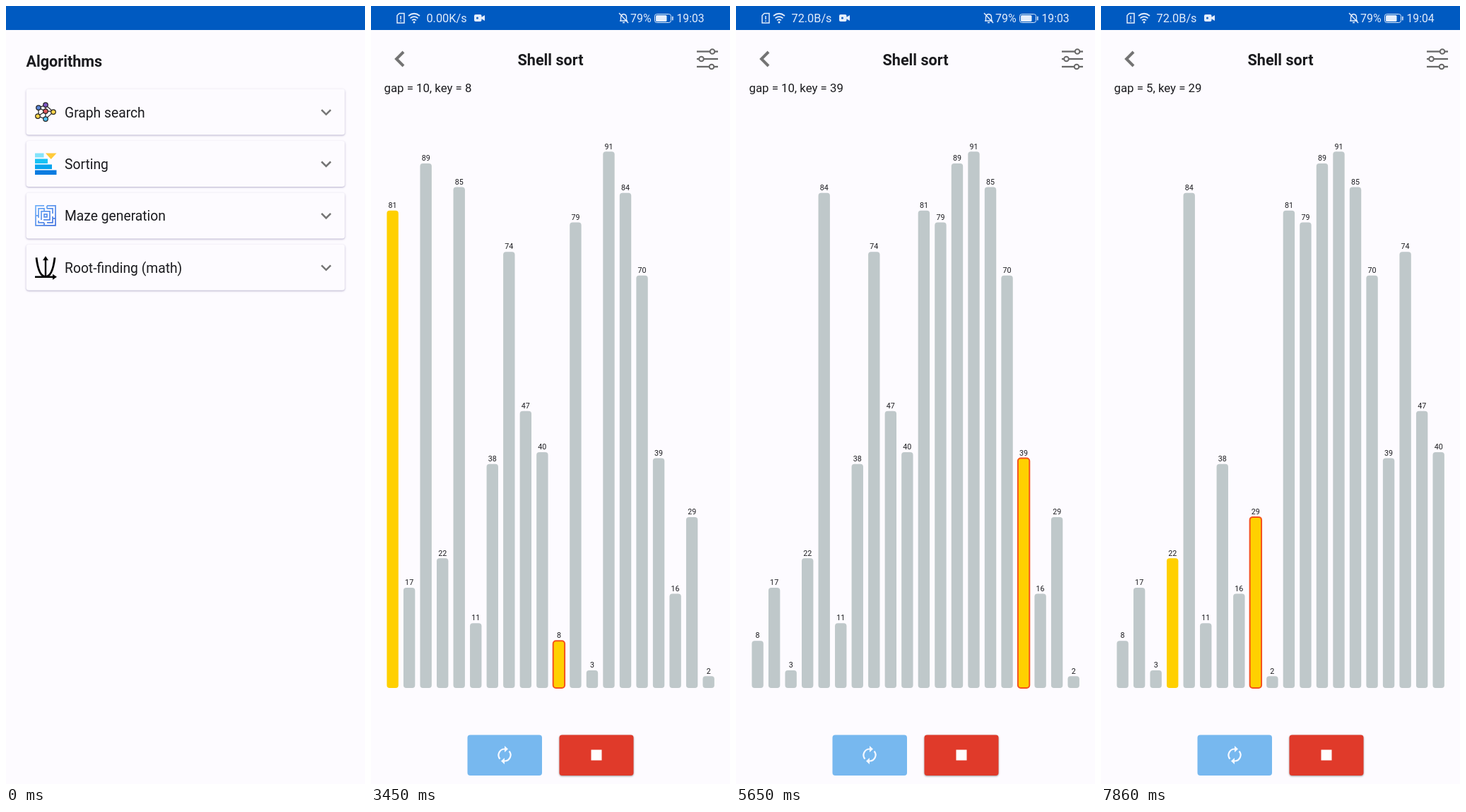
An HTML page with a canvas for the animation above (7.99 s loop, 508 px wide and 1102 px high).

```html
<!DOCTYPE html>
<html lang="en">
<head>
<meta charset="utf-8">
<title>Algorithms</title>
<style>
  html, body { margin: 0; width: 100%; height: 100%; overflow: hidden; background: #fdfbff; }
  canvas { display: block; }
</style>
</head>
<body>
<canvas id="stage" width="508" height="1102"></canvas>
<script>
const ctx = document.getElementById('stage').getContext('2d');
const LOOP = 7990;
const BG = '#fdfbff', INK = '#1b1b1f', BLUE = '#005ac1', GREY = '#757575';

// ---------- helpers ----------
const ramp = (t, from, to) => Math.min(1, Math.max(0, (t - from) / (to - from)));
const easeOut = p => 1 - (1 - p) ** 3;
const easeInOut = p => p * p * (3 - 2 * p);

function text(str, x, y, size, { color = INK, weight = 400, align = 'left' } = {}) {
  ctx.font = `${weight} ${size}px Roboto, sans-serif`;
  ctx.textAlign = align;
  ctx.fillStyle = color;
  ctx.fillText(str, x, y);
}

function box(x, y, w, h, r, fill) {
  ctx.beginPath();
  ctx.roundRect(x, y, w, h, r);
  ctx.fillStyle = fill;
  ctx.fill();
}

function raisedBox(x, y, w, h, fill, shadow) {
  ctx.save();
  ctx.shadowColor = shadow;
  ctx.shadowBlur = 2.5;
  ctx.shadowOffsetY = 1;
  box(x, y, w, h, 4, fill);
  ctx.restore();
}

function stroke(path, width, color) {
  ctx.lineWidth = width;
  ctx.strokeStyle = color;
  ctx.stroke(new Path2D(path));
}

function fill(path, color) {
  ctx.fillStyle = color;
  ctx.fill(new Path2D(path));
}

function dot(x, y, r, color, outline, width = 1) {
  ctx.beginPath();
  ctx.arc(x, y, r, 0, 7);
  ctx.fillStyle = color;
  ctx.fill();
  if (outline) {
    ctx.lineWidth = width;
    ctx.strokeStyle = outline;
    ctx.stroke();
  }
}

function at(x, y, draw) {
  ctx.save();
  ctx.translate(x, y);
  draw();
  ctx.restore();
}

function withAlpha(alpha, draw) {
  if (alpha <= 0) return;
  ctx.save();
  ctx.globalAlpha *= alpha;
  draw();
  ctx.restore();
}

// ---------- status bar ----------
function statusBar(t) {
  box(0, 0, 508, 34, 0, BLUE);
  withAlpha(ramp(t, 10, 200), () => {
    const white = '#e4edfa';
    const speed = t < 2690 ? '154B/s' : t < 4890 ? '0.00K/s' : '72.0B/s';
    stroke('M40 10.5H47V24H37V13.5Z M42 14V19 M42 20.5V22', 1.5, white);
    stroke('M53 14Q61 7.5 69 14 M55.5 17.3Q61 12.8 66.5 17.3 M58 20.3Q61 18 64 20.3', 1.7, white);
    dot(61, 23, 1.5, white);
    text(speed, 107, 23, 16.3, { color: white, align: 'center' });
    box(146, 12, 10.5, 10, 2, white);
    fill('M156 16L161 13V21L156 18Z', white);
    dot(150.5, 17, 1.5, BLUE);
    stroke('M352 21H363 M353.5 21V16Q353.5 12 357.5 11.5Q361.5 12 361.5 16V21 M356 23.5H359 M351 10L364 24', 1.4, white);
    text('79%', 367, 23, 16, { color: white });
    ctx.beginPath();
    ctx.roundRect(401.5, 11.5, 23, 12, 3);
    ctx.lineWidth = 1;
    ctx.strokeStyle = white;
    ctx.stroke();
    box(403, 13, 15.5, 9, 1.5, white);
    box(426, 14.5, 1.6, 6, 1, white);
    text(t < 5860 ? '19:03' : '19:04', 432.5, 23, 15.7, { color: white });
  });
}

// ---------- list screen ----------
// Icons are drawn in a 30 px square with its origin at the top left.
function graphIcon() {
  stroke('M5 9L15 5L26 15L15 25L4 21L15 14L5 9V21 M15 5V25 M15 14H26', 1.2, '#222');
  [[15, 5, '#7e57c2'], [5, 9, '#5c85d6'], [26, 15, '#ffd54a'],
   [15, 14, '#e0575b'], [4, 21, '#ffd54a'], [15, 25, '#4fc3f7']]
    .forEach(([x, y, color]) => dot(x, y, 3.3, color, '#222', 1.2));
}

function sortIcon() {
  box(0, 0, 12.5, 6, 0, '#84e3fa');
  fill('M15 0H30.5L22.7 8.5Z', '#ffca3a');
  box(0, 8, 18, 6.5, 0, '#17c2f5');
  box(0, 16, 24, 6.5, 0, '#07a4ee');
  box(0, 24, 30.5, 6.5, 0, '#0a7be0');
}

function mazeIcon() {
  const shade = ctx.createLinearGradient(0, 0, 30, 30);
  shade.addColorStop(0, '#74b4fa');
  shade.addColorStop(1, '#3f6fdd');
  stroke('M13 1H1V29H29V1H17 M5 18V5H13V9 M17 5H25V12 M25 16V25H17 M13 25H5V22 ' +
         'M9 21V9H21V21H12 M17 13H13V17H17Z M1 15H5 M25 19H29 M17 1V5 M13 25V29', 1.7, shade);
}

function rootIcon() {
  stroke('M2 1C4 18 8 28 15 28C22 28 26 18 28 1', 2.8, '#000');
  stroke('M15 29V3 M0 28.5H28', 2.4, '#000');
  fill('M15 -1L19 5H11Z M31 28.5L25 24.5V32.5Z', '#000');
}

const cards = [['Graph search', graphIcon], ['Sorting', sortIcon],
               ['Maze generation', mazeIcon], ['Root-finding (math)', rootIcon]];
const sorts = ['Quick', 'Bubble', 'Insertion', 'Selection', 'Merge', 'Shell', 'Cocktail shaker'];
const OPEN_HEIGHT = 357.5;

function listScreen(t) {
  text('Algorithms', 28.5, 86, 21.6, { weight: 700 });
  const extra = OPEN_HEIGHT * easeOut(ramp(t, 820, 1090));
  cards.forEach(([label, icon], i) => {
    const opens = i === 1;
    const y = 117.6 + i * 73.4 + (i > 1 ? extra : 0);
    const height = 65 + (opens ? extra : 0);
    raisedBox(28.5, y, 451, height, BG, 'rgba(80,70,130,.42)');
    at(41, y + 17.5, icon);
    text(label, 83, y + 40, 19.3);
    if (opens) sortList(y, height, t);
    const flipped = opens && extra > 0;
    const dy = y + 33;
    stroke(flipped ? `M446.5 ${dy + 3}L453 ${dy - 3.5}L459.5 ${dy + 3}`
                   : `M446.5 ${dy - 3.5}L453 ${dy + 3}L459.5 ${dy - 3.5}`, 2.5, GREY);
  });
}

function sortList(y, height, t) {
  if (height > 66) {
    ctx.save();
    ctx.beginPath();
    ctx.rect(28, y, 452, height);
    ctx.clip();
    box(41, y + 64.8, 426, 1.4, 0, '#77775f');
    sorts.forEach((name, i) => text(name + ' sort', 53, y + 99 + i * 50.9, 19.3));
    ctx.restore();
  }
  if (t >= 820) {
    withAlpha(1 - ramp(t, 1000, 1310), () =>
      dot(454, y + 37.5, 13, 'rgba(240,238,252,.5)', '#d9d6ee', 1.2));
  }
}

// ---------- sorting screen ----------
const initial = [81, 17, 89, 22, 85, 11, 38, 74, 47, 40, 8, 79, 3, 91, 84, 70, 39, 16, 29, 2];
const stepTimes = [3300, 3610, 3770, 3930, 4090, 4250, 4400, 4550, 4720, 4890, 5030, 5240, 5440,
  5640, 5810, 5990, 6160, 6330, 6500, 6670, 6960, 7110, 7260, 7410, 7560, 7710, 7855];

// Each comparison is shown, followed by either the swap or the key on its own.
function shellSteps() {
  const values = [...initial], steps = [];
  for (const gap of [10, 5]) {
    for (let i = gap; i < values.length; i++) {
      const key = values[i];
      const add = (keyAt, other) => steps.push({ values: [...values], gap, key, keyAt, other });
      for (let j = i; j >= gap; j -= gap) {
        add(j, j - gap);
        if (values[j - gap] <= key) {
          add(j, -1);
          break;
        }
        [values[j - gap], values[j]] = [key, values[j - gap]];
        add(j - gap, j);
      }
    }
  }
  return steps;
}
const steps = shellSteps();
const idle = { values: initial, keyAt: -1, other: -1 };

function bars({ values, keyAt, other }) {
  values.forEach((value, i) => {
    const x = 30.6 + i * 23.53, height = value * 8.348, y = 966 - height;
    const active = i === keyAt || i === other;
    box(x - 8.2, y, 16.4, height, 4, active ? '#ffd000' : '#bfc8ca');
    if (i === keyAt) {
      ctx.lineWidth = 2;
      ctx.strokeStyle = '#f4511e';
      ctx.stroke();
    }
    text(value, x, y - 3.8, 10.7, { align: 'center' });
  });
}

function buttons(running) {
  if (running) box(136.5, 1032.5, 105.5, 57.5, 4, '#77b8ef');
  else raisedBox(136.5, 1032.5, 105.5, 57.5, '#1e88e5', 'rgba(0,0,0,.4)');
  at(189, 1061, () => {
    const white = '#f4f8ff';
    stroke('M-6.5 5.5A8.5 8.5 0 0 1 0 -8.5 M6.5 -5.5A8.5 8.5 0 0 1 0 8.5', 2.2, white);
    fill('M0 -13L5 -8.5L0 -4Z M0 13L-5 8.5L0 4Z', white);
  });
  raisedBox(266.5, 1032.5, 105, 57.5, running ? '#e03a2a' : '#43a047', 'rgba(0,0,0,.4)');
  if (running) box(311.5, 1053.5, 15, 15, 0, '#fff');
  else fill('M313 1052V1070L327 1061Z', '#fff');
}

function sortScreen(t) {
  stroke('M46 65L36 75L46 85', 4, '#747474');
  text('Shell sort', 254, 83.5, 21.6, { weight: 700, align: 'center' });
  [[64.5, 483], [75, 467.5], [86, 482]].forEach(([y, x]) => {
    stroke(`M461 ${y}H491`, 2.3, '#686868');
    dot(x, y, 3.3, BG, '#686868', 2);
  });
  const index = stepTimes.filter(time => time <= t).length - 1;
  const step = steps[index] || idle;
  if (step.gap) text(`gap = ${step.gap}, key = ${step.key}`, 18.5, 121.5, 16.8);
  bars(step);
  buttons(t >= 3170);
}

// ---------- playback ----------
function draw(t) {
  box(0, 0, 508, 1102, 0, BG);
  const change = easeInOut(ramp(t, 1960, 2560));
  withAlpha(1 - change, () => listScreen(t));
  withAlpha(change, () => sortScreen(t));
  statusBar(t);
}

const start = performance.now();
function tick() {
  draw((performance.now() - start) % LOOP);
  requestAnimationFrame(tick);
}
tick();
</script>
</body>
</html>
```
